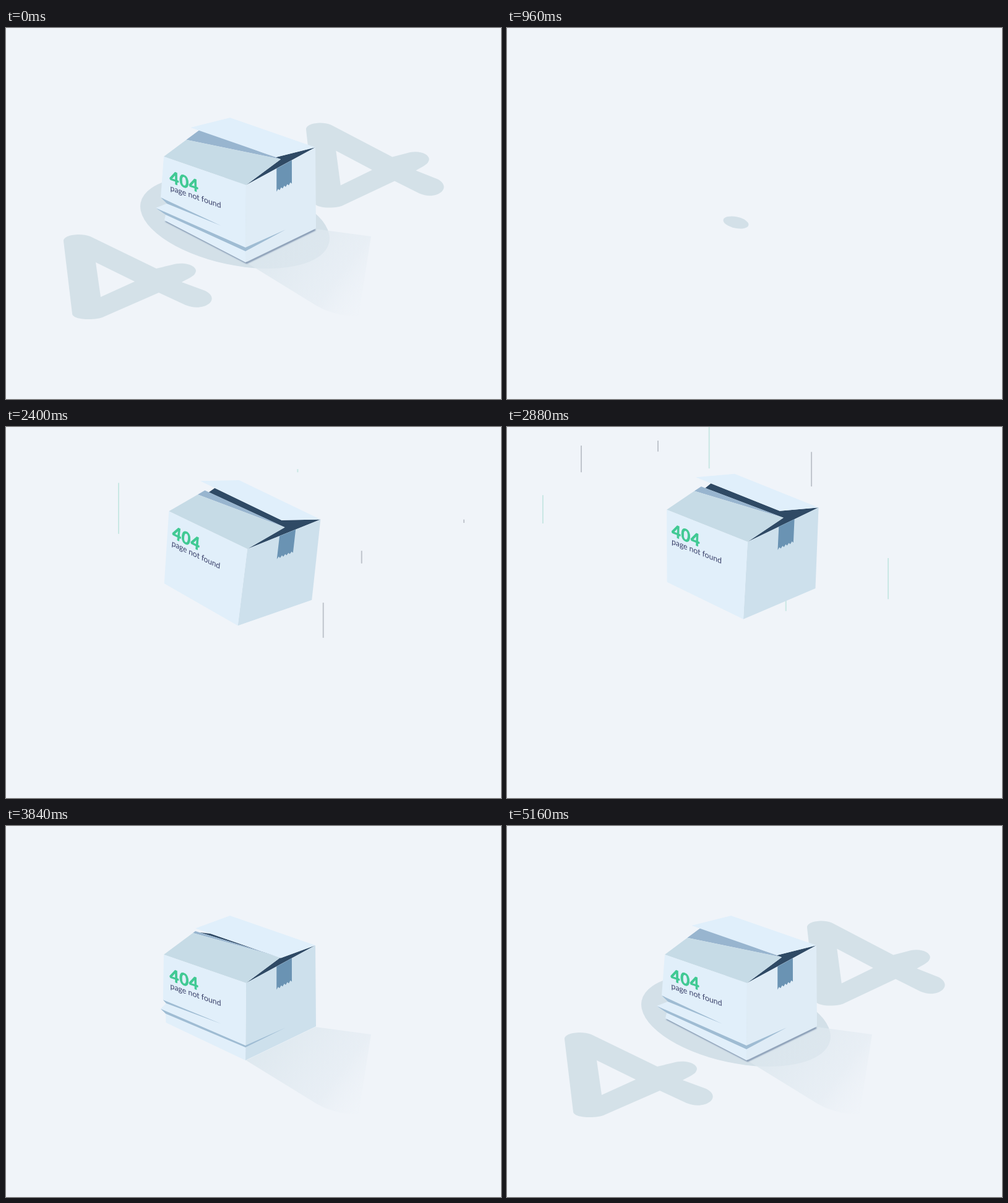
An HTML page that plays this animation: 800x600 px, repeating every 5640 ms.

```html
<!DOCTYPE html>
<html lang="en">
<head>
<meta charset="utf-8">
<title>404</title>
<style>
html, body { margin: 0; width: 100%; height: 100%; overflow: hidden; background: #f0f4f9; }
svg { display: block; width: 100vw; height: 100vh; }
text { font-family: Lato, "Open Sans", sans-serif; }
</style>
</head>
<body>
<svg viewBox="0 0 800 600">
  <defs>
    <linearGradient id="cast" gradientUnits="userSpaceOnUse" x1="425" y1="345" x2="590" y2="470">
      <stop offset="0" stop-color="#dce7ee" stop-opacity=".85"/>
      <stop offset=".6" stop-color="#e3ebf2" stop-opacity=".6"/>
      <stop offset="1" stop-color="#f0f4f9" stop-opacity="0"/>
    </linearGradient>
    <filter id="soft" x="-10%" y="-10%" width="120%" height="120%"><feGaussianBlur stdDeviation="1.2"/></filter>
    <clipPath id="hole">
      <rect x="-700" y="-700" width="1400" height="700" transform="translate(370 314.5) rotate(12)"/>
      <ellipse rx="155.7" ry="68.6" transform="translate(370 314.5) rotate(12)"/>
    </clipPath>
    <mask id="draw" maskUnits="userSpaceOnUse" x="0" y="250" width="500" height="300">
      <path id="pen" d="M356 455L116 345L130 460L330 378" fill="none" stroke="#fff" stroke-width="68"
        stroke-linejoin="round" pathLength="1" stroke-dasharray="1 2"/>
    </mask>
    <g id="four">
      <path mask="url(#draw)" fill="#d4e1e8" fill-rule="evenodd"
        d="M93 345C92 334 121 331 136 337L243 389L268 383C290 376 312 386 306 396C304 402 292 406 284 411L322 425C338 433 335 445 320 450C310 453 300 452 290 448L247 428L158 467C146 473 108 473 107 462ZM145 379L208 410L153 435Z"/>
    </g>
  </defs>
  <rect width="800" height="600" fill="#f0f4f9"/>
  <g id="fours">
    <use href="#four"/>
    <use href="#four" transform="translate(398.6 -180.5) scale(.929 1)"/>
  </g>
  <ellipse id="ring" rx="155.7" ry="68.6" fill="#d3e0e8"/>
  <path id="shade" d="M388 379L500 325L590 337L570 466Q530 466 500 448Z" fill="url(#cast)"/>
  <path id="contact" d="M258 312L389 380L500 326" fill="none" stroke="#5f7799" stroke-width="2" filter="url(#soft)"/>
  <g id="wind" stroke-width="2"></g>
  <g id="clip">
    <g id="box">
      <polygon id="inside" fill="#2f4a65"/>
      <polygon id="strip" fill="#98b5cf"/>
      <polygon id="flap" fill="#c6dbe6"/>
      <polygon id="side"/>
      <polygon id="front" fill="#e1effa"/>
      <g id="folds" fill="#9fbcd3">
        <polygon id="fold1"/>
        <polygon id="fold2"/>
        <polygon id="fold3"/>
      </g>
      <polygon id="tape" fill="#6a93b3"/>
      <polygon id="lid" fill="#e0effb"/>
      <g transform="matrix(.95 .33 .02 1 255 208)">
        <text x="9.5" y="38.5" font-size="27" font-weight="700" letter-spacing=".8" fill="#40c993" stroke="#40c993" stroke-width=".9" stroke-linejoin="round">404</text>
        <text x="10" y="51.5" font-size="13" fill="#3a416a">page not found</text>
      </g>
    </g>
  </g>
</svg>
<script>
const LOOP = 5640;
const $ = id => document.getElementById(id);
const clamp = v => Math.max(0, Math.min(1, v));
const ramp = (a, b, t) => clamp((t - a) / (b - a));
const smooth = (a, b, t) => { const p = ramp(a, b, t); return p * p * (3 - 2 * p); };
const mix = (a, b, k) => a + (b - a) * k;
const mixAll = (a, b, k) => a.map((v, i) => mix(v, b[i], k));
const add = (p, v, k = 1) => [p[0] + v[0] * k, p[1] + v[1] * k];
const sub = (a, b) => add(a, b, -1);
const poly = (id, pts) => $(id).setAttribute('points', pts.map(p => p.map(v => v.toFixed(2)).join()).join(' '));
const show = (id, on) => { $(id).style.display = on ? '' : 'none'; };

// Box corners: left, front and right on top, then the bottom
const L = [255, 208], F = [388, 254], R = [500, 193];
const BF = [387, 379], BR = [501, 324];
const down = sub(BF, F);
const ridge = add(mixAll(F, R, .5), down, -.09);
const rise = sub(ridge, F);
const back = add(add(L, sub(R, F)), [-5, -2]);

// Flap states: front flap reach, strip reach, lid reach, lid lift
const LOOSE = [.77, .96, .56, .205];
const SHUT = [.84, .91, .5, .08];
const OPEN = [.65, 1.04, .57, .15];

let seed = 11;
const rand = () => (seed = seed * 16807 % 2147483647) / 2147483647;
rand();
const wind = [0, 3, 6, 9, 13, 14, 17, 19, 20, 21, 22, 25, 27, 33].map(col => {
  const el = document.createElementNS('http://www.w3.org/2000/svg', 'line');
  const x = 58 + col * 20.67;
  const top = 360 * rand() ** 2 - 30;
  el.setAttribute('x1', x);
  el.setAttribute('x2', x);
  el.setAttribute('stroke', rand() < .5 ? '#c9e7e4' : '#bfc4cc');
  $('wind').append(el);
  return { el, top, bottom: top + 110 + 90 * rand(), start: 1240 + 700 * rand() };
});

function drawWind(t) {
  const every = 905, life = 500, last = 2840;
  for (const { el, top, bottom, start } of wind) {
    const age = t - start;
    const begun = start + Math.floor(age / every) * every;
    const p = (t - begun) / life;
    const on = age > 0 && begun < last && p < 1;
    el.style.display = on ? '' : 'none';
    el.setAttribute('y1', mix(bottom, top, clamp(p * 1.5 - .5)));
    el.setAttribute('y2', mix(bottom, top, clamp(p * 1.5)));
  }
}

function height(t) {
  if (t < 280) return -82 * smooth(40, 280, t);
  if (t < 1240) return -82 + 440 * ramp(280, 600, t) ** 2;
  if (t < 1720) return -400 * (1 - ramp(1240, 1720, t)) ** 2;
  if (t < 3360) return -57 * smooth(1720, 2420, t) - 23 * smooth(2420, 3360, t);
  if (t < 3620) return mix(-80, -128, smooth(3360, 3620, t));
  return -128 * (1 - ramp(3620, 3790, t) ** 2);
}

function tilt(t) {
  if (t < 1240) return 0;
  const swing = .3 - 7.8 * Math.cos((t - 1760) / 1600 * 2 * Math.PI);
  return swing * (1 - smooth(3360, 3640, t));
}

function drawTop(flaps) {
  const [reach, stripReach, lidReach, lift] = flaps;
  const tip = add(L, rise, reach), stripTip = add(L, rise, stripReach);
  const swing = add(add([0, 0], sub(F, R), lidReach), down, -lift);
  const lidTip = add(back, swing), lidIn = add(R, swing);
  poly('inside', [mixAll(lidTip, lidIn, .18), lidIn, R, F, ridge, mixAll(stripTip, ridge, .05)]);
  poly('strip', [tip, stripTip, ridge]);
  poly('flap', [L, tip, ridge, F]);
  poly('lid', [lidTip, back, R, lidIn]);
}

function drawFront(crush) {
  const BL = mixAll([261, 325], [256, 311], crush);
  const bend = (k, x, y) => mixAll(mixAll(L, BL, k), [x, y], crush);
  const t1 = bend(.73, 250, 274), n1 = bend(.74, 260, 284);
  const t2 = bend(.84, 242, 291), n2 = bend(.88, 258, 302);
  const crease = [387, 355], under = [387, 355 + 6 * crush];
  poly('front', [L, t1, n1, t2, n2, BL, BF, F]);
  poly('fold1', [t1, [348, 320], n1]);
  poly('fold2', [t2, crease, under, n2]);
  poly('fold3', [crease, [452, 326], under]);
  show('folds', crush > 0);
}

function drawSide(open) {
  const tone = mixAll([205, 224, 236], [223, 236, 246], open).map(Math.round);
  $('side').setAttribute('fill', `rgb(${tone})`);
  poly('side', [F, R, BR, BF]);
  const at = (u, v) => mixAll(mixAll(F, R, u), mixAll(BF, BR, u), v);
  const tape = [at(.44, 0), at(.66, 0)];
  for (let i = 10; i >= 0; i--) tape.push(at(.44 + .022 * i, i % 2 ? .07 + .2 : .295));
  poly('tape', tape);
}

function drawBox(t) {
  const early = t < 1000;
  const open = early ? 1 - smooth(40, 220, t) : smooth(3850, 4180, t);
  const crush = early ? 1 - smooth(40, 260, t)
    : .5 * smooth(3775, 3840, t) + .5 * smooth(3850, 4180, t);
  const loose = early ? 0 : 1 - smooth(3640, 3800, t);

  show('box', t < 600 || t >= 1240);
  $('box').setAttribute('transform', `translate(0 ${height(t)}) rotate(${tilt(t)} 388 272)`);
  $('clip').setAttribute('clip-path', early ? 'url(#hole)' : 'none');
  drawTop(mixAll(mixAll(SHUT, OPEN, open), LOOSE, loose));
  drawFront(crush);
  drawSide(open);
}

function drawGround(t) {
  const early = t < 2000;
  const shrink = 1 - (1 - ramp(600, 1200, t)) ** 1.6;
  const ring = early ? 1 - smooth(0, 1, shrink) : smooth(3900, 4400, t);
  $('ring').setAttribute('transform', `translate(370 314.5) rotate(12) scale(${ring})`);

  const ink = early ? 1 - smooth(40, 460, t) : smooth(4240, 4800, t);
  show('fours', ink > 0);
  $('pen').setAttribute('stroke-dashoffset', 1 - ink);

  $('shade').setAttribute('opacity', early ? 1 - smooth(40, 240, t) : smooth(3720, 3830, t));
  $('contact').setAttribute('opacity', early ? 1 - smooth(40, 120, t) : smooth(3860, 4180, t));
}

function draw(t) {
  drawGround(t);
  drawWind(t);
  drawBox(t);
}

const begin = performance.now();
function tick() {
  draw((performance.now() - begin) % LOOP);
  requestAnimationFrame(tick);
}
draw(0);
requestAnimationFrame(tick);
</script>
</body>
</html>
```
